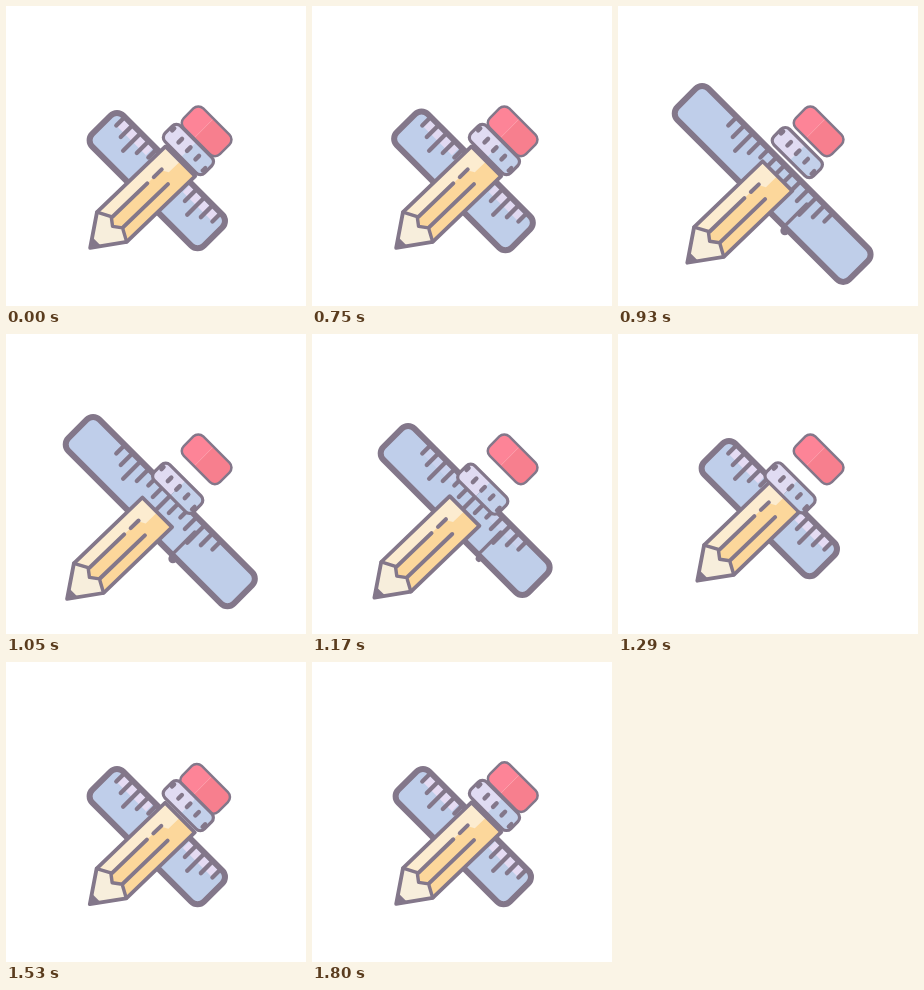
An HTML page with a canvas for the animation above (1.89 s loop, 300 by 300 pixels).

```html
<!DOCTYPE html>
<html lang="en">
<head>
<meta charset="utf-8">
<title>Pencil and ruler</title>
<style>
html, body { margin: 0; width: 100%; height: 100%; overflow: hidden; background: #fff; }
canvas { display: block; width: 300px; height: 300px; }
</style>
</head>
<body>
<canvas id="stage" width="300" height="300"></canvas>
<script>
const ctx = document.getElementById('stage').getContext('2d');
const LOOP = 1890, STEP = 30, LAST = 1800;
const INK = '#83778a';

const progress = (t, from, to) => Math.max(0, Math.min(1, (t - from) / (to - from)));
const easeIn = p => p * p;
const easeOut = p => 1 - easeIn(1 - p);
const smooth = p => p * p * (3 - 2 * p);

// Moves out to its peak at `top`, then falls back with growing speed.
function swing(t, from, top, fall, end, rise = easeOut) {
  return rise(progress(t, from, top)) * (1 - easeIn(progress(t, fall, end)));
}

// Damped recoil after a knock.
function recoil(t, hit) {
  const s = Math.max(0, t - hit);
  return -Math.exp(-s / 110) * Math.sin(s * Math.PI / 170);
}

const rulerReach = t => 38 * swing(t, 720, 930, 930, 1290, smooth);
const bodyShift = t => 34 * swing(t, 820, 1107, 1107, 1312) + 5 * recoil(t, 1312);
const ferruleShift = t => 16.5 * swing(t, 900, 1110, 1260, 1350) + 6 * recoil(t, 1350);
const eraserShift = t => 25 * recoil(t, 1330);

function trace(points) {
  ctx.beginPath();
  points.forEach(([x, y]) => ctx.lineTo(x, y));
}

function line(width, ...points) {
  trace(points);
  ctx.lineWidth = width;
  ctx.stroke();
}

function polygon(color, ...points) {
  trace(points);
  ctx.fillStyle = color;
  ctx.fill();
}

function box(color, x, y, w, h) {
  ctx.fillStyle = color;
  ctx.fillRect(x, y, w, h);
}

// Rounded shape with two fills meeting at x = split.
function capsule(x, y, w, h, r, left, right, split, stroke) {
  ctx.beginPath();
  ctx.roundRect(x, y, w, h, r);
  ctx.save();
  ctx.clip();
  box(left, x, y, split - x, h);
  box(right, split, y, x + w - split, h);
  ctx.restore();
  ctx.lineWidth = stroke;
  ctx.stroke();
}

function shifted(dy, paint) {
  ctx.save();
  ctx.translate(0, dy);
  paint();
  ctx.restore();
}

function drawRuler(reach) {
  const open = Math.min(1, reach / 30);
  const left = -79 - reach, right = 79 + reach * 1.25;
  if (open > 0.5) {
    ctx.fillStyle = INK;
    ctx.beginPath();
    ctx.arc(46.5, 24.5, 4.5 * open, 0, Math.PI * 2);
    ctx.fill();
  }
  capsule(left, -22, right - left, 44, 9, '#bfceea', '#bfcee9', 0, 6);
  ctx.globalAlpha = 1 - open;
  box('#e5dbf3', -68, -19, 42, 9);
  box('#e5dbf3', 26, -19, 42, 9);
  ctx.globalAlpha = 1;
  const lengths = [11, 16, 24, 16];
  for (let i = 0; i < 13; i++) {
    const x = -68 + i * 11.33;
    line(4.3, [x, -21], [x, lengths[i % 4] - 21]);
  }
  if (open > 0.5) line(3.4, [43, -10], [43, 20]);
}

function drawBody() {
  const edge = [[-21, 65], [-8, 58], [0, 64], [8, 58], [21, 65]];
  const top = -30;
  ctx.transform(1, 0, -0.02, 1, 2, 0);
  polygon('#f7eedc', ...edge, [0, 95]);
  polygon('#fcd79b', [-21, top], [21, top], ...edge.slice().reverse());
  polygon('#fcecd0', [-21, top], [0, top], [0, -14], [-7, -10], [-7, 57], [-21, 65]);
  polygon(INK, [-6, 86], [6, 86], [0, 95]);
  line(3.8, [-21, top], [21, top], [21, 65], [0, 95], [-21, 65], [-21, top]);
  line(3.4, ...edge);
  line(4, [-7, 57], [-7, 9]);
  line(4, [-7, 0], [-7, -11]);
  line(4, [8, 57], [8, -5]);
}

function drawFerrule() {
  capsule(-28, -55, 56, 22, 6, '#e0dbf2', '#c3d0ea', 0, 3.2);
  for (const x of [-12, 0, 12]) line(4.4, [x, -47], [x, -42]);
  line(4.4, [-25, -49], [-25, -46]);
  line(4, [25, -43], [25, -39]);
}

function drawEraser() {
  capsule(-25.5, -83.5, 51, 27.5, 7, '#fd8497', '#f77f8e', -4, 2.5);
}

function draw(t) {
  box('#fff', 0, 0, 300, 300);
  ctx.save();
  ctx.translate(151.3, 174.6);
  ctx.rotate(Math.PI / 4);
  ctx.strokeStyle = INK;
  ctx.lineCap = ctx.lineJoin = 'round';
  drawRuler(rulerReach(t));
  shifted(bodyShift(t), drawBody);
  shifted(eraserShift(t), drawEraser);
  shifted(ferruleShift(t), drawFerrule);
  ctx.restore();
}

let start;
function tick(now) {
  start ??= now;
  const t = (now - start) % LOOP;
  draw(Math.min(LAST, Math.floor(t / STEP) * STEP));
  requestAnimationFrame(tick);
}
draw(0);
requestAnimationFrame(tick);
</script>
</body>
</html>
```
